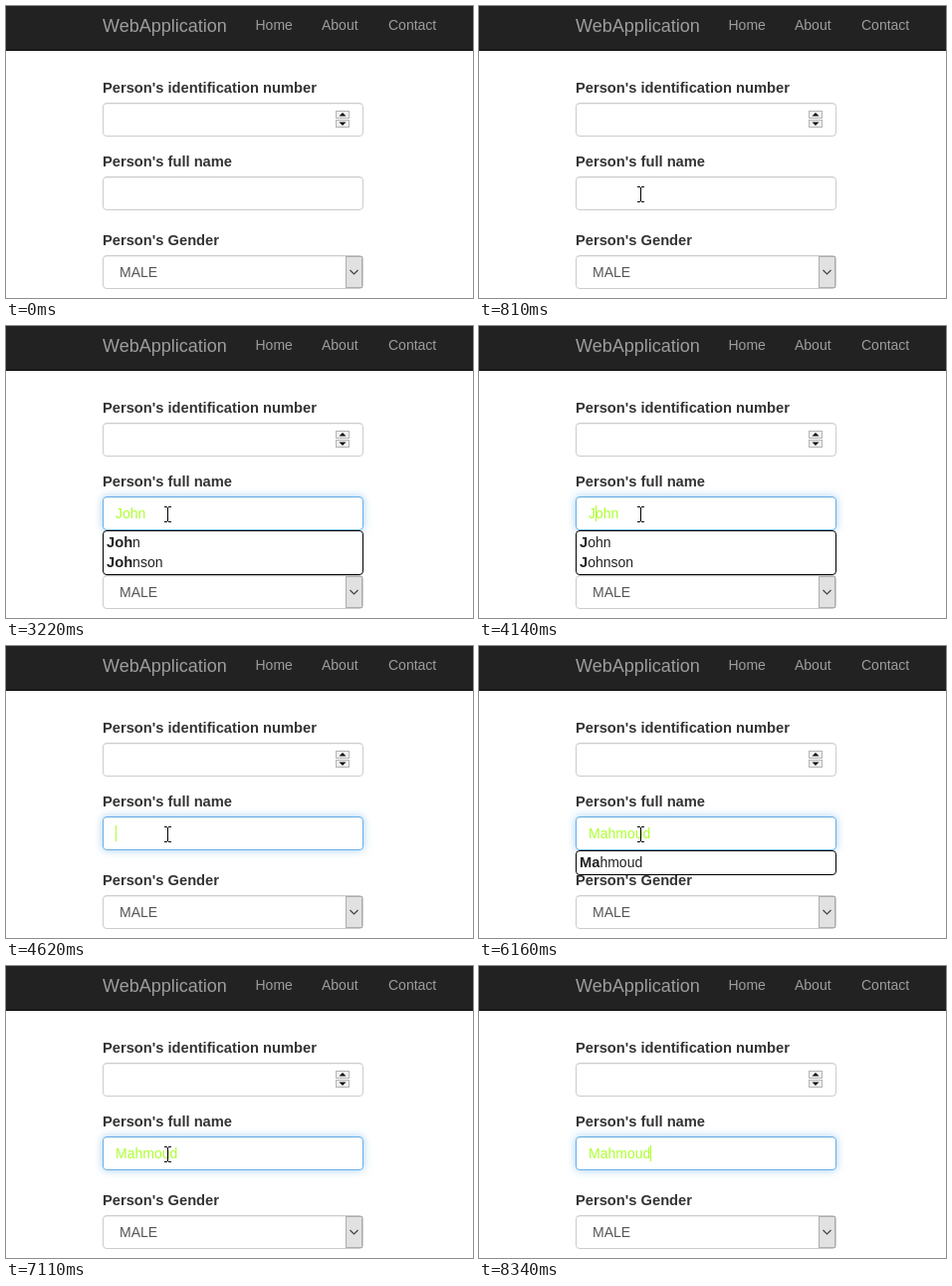
An HTML page with a canvas that plays this animation: 469 px wide and 293 px high, repeating every 8.8 s.

```html
<!DOCTYPE html>
<html lang="en">
<head>
<meta charset="utf-8">
<title>Autocomplete form</title>
<style>
  html, body { margin: 0; width: 100%; height: 100%; overflow: hidden; background: #fff; }
  canvas { display: block; }
</style>
</head>
<body>
<canvas id="stage" width="469" height="293"></canvas>
<script>
const ctx = document.getElementById('stage').getContext('2d');
const LOOP = 8800;
const FAMILY = '"Liberation Sans", Arial, sans-serif';
const REGULAR = '14px ' + FAMILY;
const BOLD = 'bold 14.7px ' + FAMILY;
const BRAND = '18px ' + FAMILY;
const LEFT = 97, WIDTH = 262, FIELD_H = 34, NAME_Y = 171;
const NAMES = ['John', 'Johnson', 'Mahmoud'];
const REST = [162, 189];

// time, typed text (null = not focused), caret visible, menu mode
const STEPS = [
  [0, null, 0], [1270, '', 1], [1830, '', 0],
  [2210, 'J', 1, 'open'], [2440, 'Jo', 1, 'open'], [2670, 'Joh', 1, 'open'],
  [3220, 'Joh', 0, 'open'], [3680, 'Joh', 1, 'open'],
  [3910, 'Jo', 1, 'open'], [4140, 'J', 1, 'open'],
  [4620, '', 1], [5150, '', 0],
  [5550, 'M', 1, 'open'], [5700, 'Ma', 1, 'open'], [6160, 'Ma', 0, 'open'],
  [6240, 'Mahmoud', 1, 'picked'], [6790, 'Mahmoud', 0, 'picked'],
  [7110, 'Mahmoud', 0], [7340, 'Mahmoud', 1], [7870, 'Mahmoud', 0], [8340, 'Mahmoud', 1]
];

function rect(x, y, w, h, color) {
  ctx.fillStyle = color;
  ctx.fillRect(x, y, w, h);
}

function text(value, x, y, color, font = REGULAR) {
  ctx.font = font;
  ctx.fillStyle = color;
  ctx.fillText(value, x, y);
  return ctx.measureText(value).width;
}

function line(points, color, width = 1) {
  ctx.beginPath();
  points.forEach(([x, y]) => ctx.lineTo(x, y));
  ctx.strokeStyle = color;
  ctx.lineWidth = width;
  ctx.stroke();
}

function polygon(points, fill) {
  ctx.beginPath();
  points.forEach(([x, y]) => ctx.lineTo(x, y));
  ctx.closePath();
  ctx.fillStyle = fill;
  ctx.fill();
}

function roundBox(x, y, w, h, border) {
  ctx.beginPath();
  ctx.roundRect(x + 0.5, y + 0.5, w - 1, h - 1, 3.5);
  ctx.fillStyle = '#fff';
  ctx.fill();
  ctx.strokeStyle = border;
  ctx.lineWidth = 1;
  ctx.stroke();
}

function field(y, focus = 0) {
  if (focus) {
    ctx.save();
    ctx.shadowColor = `rgba(102,175,233,${0.6 * focus})`;
    ctx.shadowBlur = 8;
    ctx.beginPath();
    ctx.roundRect(LEFT, y, WIDTH, FIELD_H, 4);
    ctx.fillStyle = '#fff';
    ctx.fill();
    ctx.restore();
  }
  const mix = (from, to) => Math.round(from + (to - from) * focus);
  roundBox(LEFT, y, WIDTH, FIELD_H, `rgb(${mix(204, 102)},${mix(204, 175)},${mix(204, 233)})`);
  rect(LEFT + 2, y + 1, WIDTH - 4, 1, 'rgba(0,0,0,.06)');
}

function navbar() {
  rect(0, 0, 469, 45, '#222');
  rect(0, 44, 469, 1, '#080808');
  text('WebApplication', LEFT, 26, '#9d9d9d', BRAND);
  text('Home', 250.5, 24, '#9d9d9d');
  text('About', 317, 24, '#9d9d9d');
  text('Contact', 384, 24, '#9d9d9d');
}

function spinner() {
  for (const [y, dir] of [[105, -1], [114, 1]]) {
    rect(331, y, 14, 8, '#b4b4b4');
    rect(332, y + 1, 12, 6, '#f0f0f0');
    const mid = y + 4;
    polygon([[334.5, mid - dir * 1.5], [341.5, mid - dir * 1.5], [338, mid + dir * 2]], '#111');
  }
}

function select() {
  field(250);
  text('MALE', 114, 272, '#555');
  rect(341, 251, 17, 32, '#adadad');
  rect(342, 252, 15, 30, '#e1e1e1');
  line([[345.5, 265], [349.5, 269], [353.5, 265]], '#444', 1.2);
}

function menu(query, picked) {
  const prefix = picked ? 'Ma' : query;
  const items = NAMES.filter(name => name.startsWith(prefix));
  roundBox(LEFT, 205, WIDTH, 5 + 20 * items.length, '#000');
  items.forEach((name, i) => {
    if (picked) rect(98, 207, 260, 20, '#0097cf');
    const color = picked ? '#fff' : '#222';
    const y = 222 + 20 * i;
    const w = text(prefix, 101, y, color, BOLD);
    text(name.slice(prefix.length), 101 + w, y, color);
  });
}

function nameText(query, caret) {
  if (query) text(NAMES.find(name => name.startsWith(query)), 110, 193, '#adff2f');
  ctx.font = REGULAR;
  if (caret) rect(Math.floor(110 + ctx.measureText(query).width), 180, 1, 16, '#adff2f');
}

// Pointer position, or null while it is off stage
function pointerAt(t) {
  const between = (a, b, k) => a.map((v, i) => Math.round(v + (b[i] - v) * k));
  if (t < 120 || t >= 8340) return null;
  if (t < 810) {
    const k = Math.floor((t - 120) / 76.67) / 9;
    return between([323, 282], REST, 1 - (1 - k) ** 1.7);
  }
  if (t < 7870) return REST;
  const k = (Math.floor((t - 7870) / 78.34) + 1) / 6;
  return between(REST, [400, 286], k ** 1.5);
}

function pointer([x, y]) {
  const overName = x >= LEFT && x < LEFT + WIDTH && y >= NAME_Y && y < NAME_Y + FIELD_H;
  const overLabel = x >= LEFT && x < 215 && y >= 228 && y < 245;
  if (overName || overLabel) {
    rect(x, y - 7, 1, 14, '#000');
    for (const edge of [y - 8, y + 7]) {
      rect(x - 3, edge, 3, 1, '#000');
      rect(x + 1, edge, 3, 1, '#000');
    }
    return;
  }
  const arrow = [[0, 0], [0, 16], [4, 12.5], [6.5, 18], [8.5, 17], [6.2, 11.5], [11, 11.5], [0, 0]]
    .map(([dx, dy]) => [x + 0.5 + dx, y + 0.5 + dy]);
  polygon(arrow, '#fff');
  line(arrow, '#000');
}

function draw(t) {
  const [, query, caret, mode] = STEPS.findLast(step => step[0] <= t);
  const focus = query === null ? 0 : Math.min(1, (Math.floor((t - 1270) / 80) + 1) / 3);
  rect(0, 0, 469, 293, '#fff');
  navbar();
  text("Person's identification number", LEFT, 87, '#333', BOLD);
  field(97);
  spinner();
  text("Person's full name", LEFT, 161, '#333', BOLD);
  field(NAME_Y, focus);
  text("Person's Gender", LEFT, 240, '#333', BOLD);
  select();
  if (query !== null) nameText(query, caret);
  if (mode) menu(query, mode === 'picked');
  const spot = pointerAt(t);
  if (spot) pointer(spot);
}

const start = performance.now();
function tick() {
  draw((performance.now() - start) % LOOP);
  requestAnimationFrame(tick);
}
tick();
</script>
</body>
</html>
```
